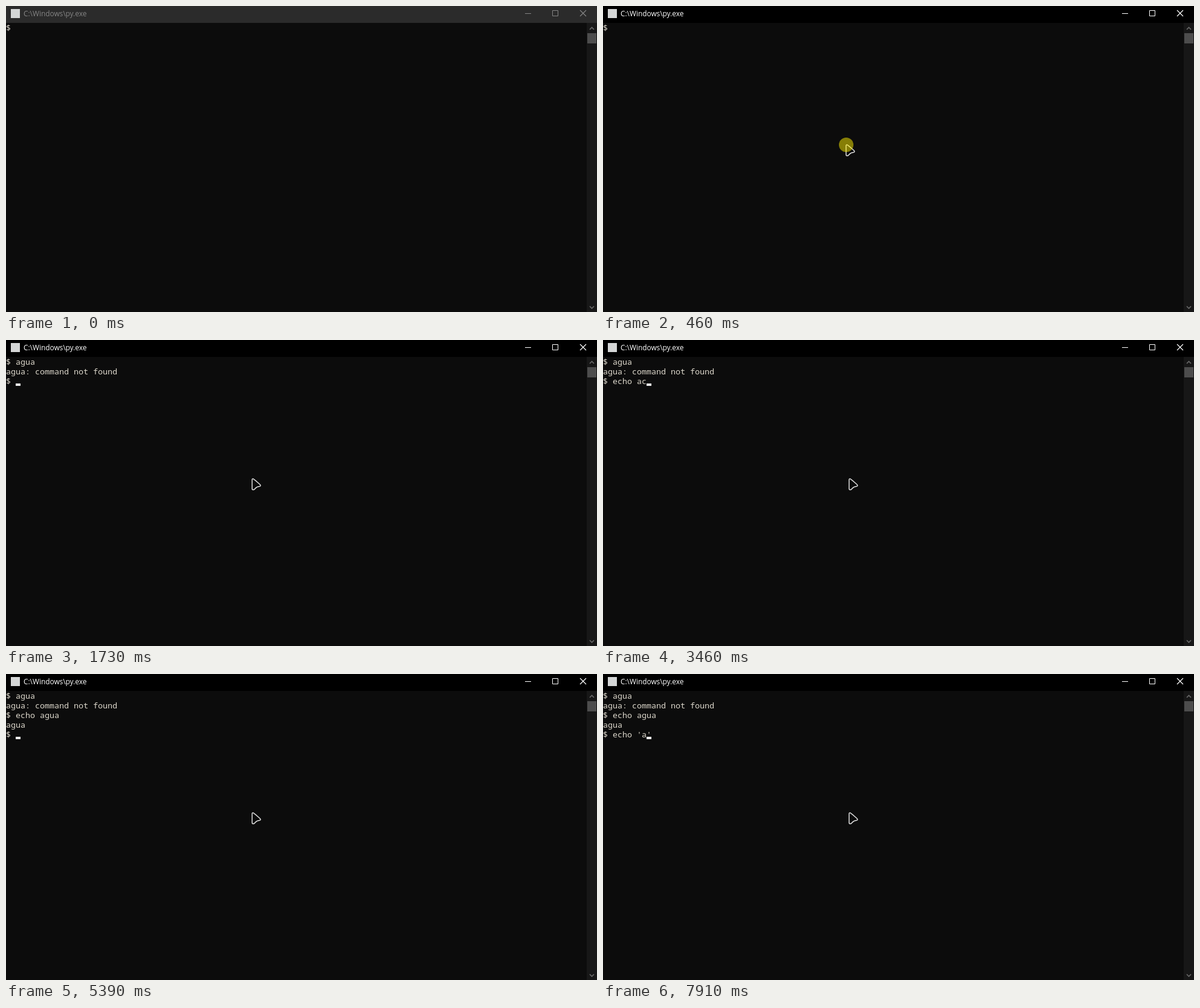
An HTML page for the animation above (8 s loop, 977 by 507 pixels).

```html
<!DOCTYPE html>
<html lang="en">
<head>
<meta charset="utf-8">
<title>Terminal</title>
<style>
  html, body { margin: 0; width: 100%; height: 100%; overflow: hidden; background: #0c0c0c; }
  svg { display: block; }
  text { white-space: pre; }
  #title { font: 11.85px "Open Sans", "Noto Sans", sans-serif; }
  #screen { font: 13.333px "Noto Sans Mono", "DejaVu Sans Mono", monospace; fill: #dcd7cb; }
  .line { fill: none; stroke: currentColor; }
</style>
</head>
<body>
<svg width="977" height="507" viewBox="0 0 977 507">
  <rect width="977" height="507" fill="#0c0c0c"/>
  <g id="bar">
    <rect id="barFill" width="977" height="28"/>
    <rect x="8" y="5" width="15" height="15" fill="#d4d6d6"/>
    <text id="title" x="29" y="17" fill="currentColor">C:\Windows\py.exe</text>
    <path class="line" d="M858 12.5h10M903.5 7.5h9v9h-9z"/>
    <path class="line" stroke-width="1.2" d="M949 7l10 10m0-10l-10 10"/>
  </g>
  <rect x="960" y="28" width="17" height="479" fill="#171717"/>
  <rect x="961" y="45" width="15" height="17" fill="#4d4d4d"/>
  <path fill="none" stroke="#686868" stroke-width="1.7" d="M965 39l3.500-3.500 3.500 3.500M965 497.500l3.500 3.500 3.500-3.500"/>
  <g id="screen"></g>
  <rect id="caret" width="8" height="4" fill="#f2f2f2"/>
  <path id="pointer" fill="#0c0c0c" stroke="#dedede" stroke-width="1.5" stroke-linejoin="round"
    d="M.8 3Q.8 .2 3.200 1.300Q5 2.300 14 10.500Q16 13 13 13.500Q8.500 14 6 17Q4.400 19.200 2.600 19.200Q.8 19.200 .8 17Z"/>
  <circle id="click" cx="402" cy="230" r="12" fill="#fff000" fill-opacity=".5"/>
</svg>
<script>
const LOOP = 8000, CELL = 8, ROW = 16, TOP = 28, OFF = -1;
const $ = id => document.getElementById(id);

// Finished lines shown above the prompt, by number of commands run
const first = ['$ agua', 'agua: command not found'];
const history = [[], first, [...first, '$ echo agua', 'agua']];

// [time, commands run, typed text, caret column]
const typing = [
  [0, 0, '', OFF], [530, 0, '', 0], [1000, 0, '', OFF],
  [1060, 0, 'a', 1], [1260, 0, 'ag', 2], [1400, 0, 'agu', 3],
  [1460, 0, 'agua', 4], [1530, 0, 'agua', OFF],
  [1730, 1, '', 0], [2320, 1, 'e', 1], [2520, 1, 'ec', 2],
  [2590, 1, 'ech', OFF], [2790, 1, 'echo', 4], [3120, 1, 'echo', OFF],
  [3250, 1, 'echo ', 5], [3320, 1, 'echo a', 6], [3460, 1, 'echo ac', 7],
  [3590, 1, 'echo ach', 8], [3650, 1, 'echo acho', 9], [4190, 1, 'echo acho', OFF],
  [4520, 1, 'echo ach', 8], [4590, 1, 'echo ac', 7], [4650, 1, 'echo a', 6],
  [4850, 1, 'echo ag', 7], [4980, 1, 'echo agu', 8], [5050, 1, 'echo agua', 9],
  [5250, 1, 'echo agua', OFF],
  [5390, 2, '', 0], [6120, 2, 'e', 1], [6250, 2, 'ec', 2], [6320, 2, 'ech', 3],
  [6520, 2, 'echo', 4], [6650, 2, 'echo ', 5], [6780, 2, 'echo ', OFF],
  [6980, 2, "echo ''", 6], [7180, 2, "echo 'a'", 7], [7310, 2, "echo ''", 6],
  [7510, 2, "echo ''", OFF], [7840, 2, "echo 'a'", OFF], [7910, 2, "echo 'a'", 7]
];

// [time, x, y]
const moves = [
  [0, -40, -40], [260, 395, 459], [330, 399, 330], [400, 401, 250],
  [460, 401, 229], [730, 403, 229], [800, 406, 229]
];

const rows = Array.from({ length: 5 }, (_, i) => {
  const row = document.createElementNS('http://www.w3.org/2000/svg', 'text');
  row.setAttribute('y', TOP + i * ROW + 13);
  return $('screen').appendChild(row);
});

const at = (list, t) => list.findLast(step => step[0] <= t);
const show = (el, on) => el.setAttribute('visibility', on ? 'visible' : 'hidden');
const place = (el, x, y) => el.setAttribute('transform', `translate(${x} ${y})`);

function draw(t) {
  const [, done, typed, column] = at(typing, t);
  const lines = [...history[done], '$ ' + typed];
  rows.forEach((row, i) => { row.textContent = lines[i] || ''; });
  show($('caret'), column !== OFF);
  place($('caret'), (column + 2) * CELL, TOP + lines.length * ROW - 4);

  const [, x, y] = at(moves, t);
  place($('pointer'), x, y);
  show($('click'), t >= 460 && t < 530);

  const active = t >= 460;
  $('barFill').setAttribute('fill', active ? '#000' : '#2b2b2b');
  $('bar').style.color = active ? '#fff' : '#858585';
}

const start = performance.now();
function tick() {
  draw((performance.now() - start) % LOOP);
  requestAnimationFrame(tick);
}
tick();
</script>
</body>
</html>
```
